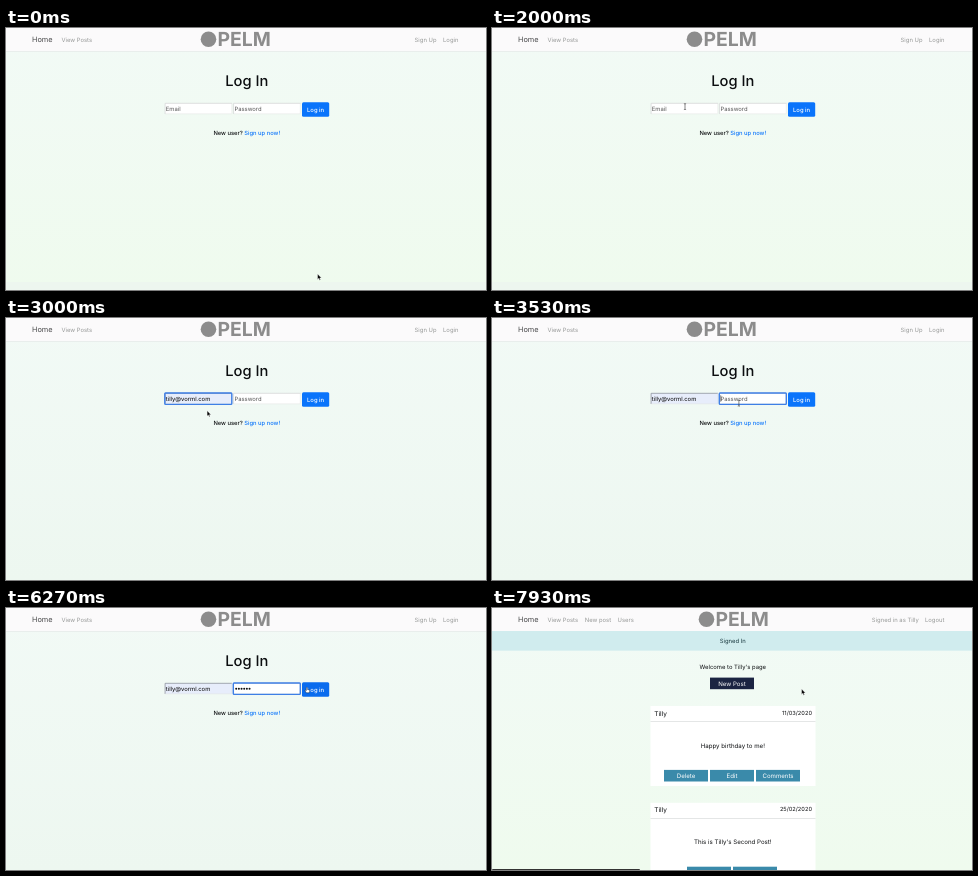
An HTML page that plays this animation: 480x262 px, repeating every 8000 ms.

```html
<!DOCTYPE html>
<html lang="en">
<head>
<meta charset="utf-8">
<title>Log In</title>
<style>
  html, body { margin: 0; width: 100%; height: 100%; overflow: hidden; background: #f0faf3; }
  svg { display: block; width: 100%; height: 100%; }
  text {
    font-family: Inter, Roboto, "Liberation Sans", sans-serif;
    text-rendering: geometricPrecision;
    white-space: pre;
  }
</style>
</head>
<body>
<svg id="stage" viewBox="0 0 480 262"></svg>
<script>
const LOOP = 8000;
const BASE = 5.88;
const INK = "#0c0e10", MUTED = "#969897", BLUE = "#0a74fb", TEAL = "#3a8aaa", LOGO = "#8c8c8c";
const BOLDER = 'font-weight="500"';
const NAME = "Tilly", MAIL = "tilly@vorml.com";
const MAILS = [MAIL, "t60352@vorml.com", "sam@vorml.com", "nora@vorml.com", "tim@vorml.com", "sam@vorml"];

const rect = (x, y, w, h, fill, more = "") =>
  `<rect x="${x}" y="${y}" width="${w}" height="${h}" fill="${fill}" ${more}/>`;
const text = (x, y, str, fill = INK, size = BASE, more = "") =>
  `<text x="${x}" y="${y}" fill="${fill}" font-size="${size}" ${more}>${str}</text>`;
const mid = (x, y, str, fill, size, more = "") =>
  text(x, y, str, fill, size, `text-anchor="middle" ${more}`);
const end = (x, y, str, fill, size) => text(x, y, str, fill, size, 'text-anchor="end"');
const group = (id, body) => `<g id="${id}">${body}</g>`;

function logo(x) {
  return `<circle cx="${x + 7.5}" cy="11.2" r="7.8" fill="${LOGO}"/>` +
    text(x + 16.5, 18.2, "PELM", LOGO, 19.4, 'font-weight="700"');
}

function button(x, y, label, fill = TEAL) {
  return rect(x, y, 44, 11.6, fill) + mid(x + 22, y + 8.1, label, "#fff", 6.1);
}

function field(id, x) {
  return rect(x, 75, 67.2, 11, "#fff", `id="${id}Box"`) +
    `<path id="${id}Edge" d="M${x + .3} 86V75.3H${x + 67.2}" fill="none" stroke="#cfd2d1" stroke-width=".7"/>` +
    `<path d="M${x} 85.8H${x + 67}V75" fill="none" stroke="#dfe3e1" stroke-width=".5"/>` +
    rect(x, 75, 67, 11.4, "none", `id="${id}Ring" rx=".8" stroke="#3f7fe6" stroke-width="1.4"`);
}

function card(y, date, message, labels) {
  const left = 240 - labels.length * 23 + 1;
  return rect(158.5, y, 165, 80, "#fff") +
    text(162.3, y + 9.6, NAME, INK, 6.5) +
    end(320, y + 8.6, date, INK, 5.7) +
    rect(158.5, y + 15.2, 165, .6, "#d3d6d5") +
    mid(240.8, y + 41.6, message, INK, 6.15) +
    labels.map((label, i) => button(left + i * 46, y + 63.9, label)).join("");
}

const loginPage =
  logo(195) +
  text(408.6, 14, "Sign Up", MUTED) + end(452.4, 14, "Login", MUTED) +
  mid(240.8, 57.7, "Log In", INK, 14.7, 'font-weight="550"') +
  mid(240.8, 106.8, `New user? <tspan fill="${BLUE}">Sign up now!</tspan>`, INK, 5.8, BOLDER) +
  field("mail", 158.8) + field("pass", 227.3) +
  text(159.8, 82.7, "Email", "#555", BASE, 'id="mailText"') +
  text(228.4, 82.7, "Password", "#555", BASE, 'id="passText"') +
  group("dots", Array.from({ length: 6 }, (_, i) =>
    `<circle cx="${230.2 + i * 2.67}" cy="80.8" r="1" fill="#111"/>`).join("")) +
  rect(0, 77.3, .5, 6.4, "#111", 'id="caret"') +
  rect(296, 74.2, 27.2, 14.6, BLUE, 'id="submit" rx="1.5"') +
  mid(309.6, 83.7, "Log in", "#fff", BASE, BOLDER) +
  group("menu",
    rect(158, 87.2, 75.4, 90.6, "#000", 'rx="1.2" opacity=".12"') +
    rect(158.6, 86.8, 74, 90, "#fff", 'rx="1" stroke="#c3c8c6" stroke-width=".6"') +
    rect(159, 90.2, 73.2, 13.6, "#e4e6e8", 'id="hover"') +
    MAILS.map((m, i) => text(163, 98.9 + i * 13.93, m, "#111", 5.05, BOLDER)).join(""));

const homePage =
  logo(207) +
  text(92.8, 14, "New post", MUTED) + text(125.6, 14, "Users", MUTED) +
  end(426.8, 14, `Signed in as ${NAME}`, MUTED) + end(452.4, 14, "Logout", MUTED) +
  rect(0, 23, 480, 19.6, "#d0ecee") +
  mid(240.8, 35.3, "Signed In", "#17373d") +
  mid(240.8, 61.2, `Welcome to ${NAME}'s page`) +
  button(218, 69.6, "New Post", "#1b2442") +
  card(98, "11/03/2020", "Happy birthday to me!", ["Delete", "Edit", "Comments"]) +
  card(194.8, "25/02/2020", `This is ${NAME}'s Second Post!`, ["Delete", "Edit"]);

const cursors =
  group("arrow", '<path d="M0 0V5.4L1.2 4.3 2 6.2 2.9 5.8 2.1 4H3.8Z" fill="#000" stroke="#fff" stroke-width=".35"/>') +
  group("beam", '<path d="M-1.1 -3Q0 -3 0 -2.4Q0 -3 1.1 -3M0 -2.4V2.4M-1.1 3Q0 3 0 2.4Q0 3 1.1 3" fill="none" stroke="#333" stroke-width=".6"/>') +
  group("hand", '<path d="M-.5 0Q0 -.5 .5 0V1.8L2.5 2.3Q3 2.5 2.9 3.2L2.4 5.2H-.4L-2 3Q-1.6 2.3 -.5 3.1Z" fill="#fff" stroke="#111" stroke-width=".4"/>');

const stage = document.getElementById("stage");
stage.innerHTML =
  '<defs><linearGradient id="bg" x2="0" y2="1"><stop stop-color="#f2faf6"/><stop id="bgEnd" offset="1"/></linearGradient></defs>' +
  rect(0, 0, 480, 262, "url(#bg)") +
  rect(0, 254, 480, 8, "#edf6ef", 'id="strip"') +
  rect(0, 0, 480, 23.2, "#fbfafb") + rect(0, 23, 480, .8, "#e6ecea") +
  text(26, 14.3, "Home", "#4c4d4e", 7.35) + text(55.5, 14, "View Posts", MUTED) +
  group("login", loginPage) + group("home", homePage) +
  rect(0, 261, 148, 2, "#333", 'id="status" rx="1"') +
  group("pointer", cursors);

const el = {};
stage.querySelectorAll("[id]").forEach(node => el[node.id] = node);
const show = (node, on) => node.setAttribute("display", on ? "inline" : "none");
const set = (node, key, value) => node.setAttribute(key, value);

// time, x, y of the pointer
const PATH = [
  [0, 311.6, 246], [400, 311.6, 246], [1000, 196.8, 95], [1530, 196.8, 95],
  [1670, 197, 101.5], [2000, 193, 78.6], [2200, 193, 78.6], [2530, 193, 89.2],
  [2670, 193, 94], [2870, 193, 94], [3400, 246.9, 85.2], [5870, 246.9, 85.2],
  [6270, 300.8, 79.6], [6400, 309.6, 81], [LOOP, 309.6, 81]
];
const KEYS = [4200, 4470, 4730, 5070, 5400, 5730];

function pointerAt(t) {
  const i = Math.max(1, PATH.findIndex(p => p[0] >= t));
  const [t0, x0, y0] = PATH[i - 1], [t1, x1, y1] = PATH[i];
  const u = (t - t0) / (t1 - t0), k = u * u * (3 - 2 * u);
  return [x0 + (x1 - x0) * k, y0 + (y1 - y0) * k];
}

function draw(time) {
  const step = Math.floor((time + 5) * .015);
  const t = Math.min(LOOP, Math.round(step / .15) * 10);
  const between = (a, b) => t >= a && t < b;
  const home = t >= 7600;
  const filled = t >= 2930;
  show(el.login, !home);
  show(el.home, home);
  show(el.strip, !filled);
  set(el.bgEnd, "stop-color", filled && !home ? "#edf7f0" : "#effbee");
  show(el.status, between(7130, 7600) || t >= 7930);

  const mailFocus = between(2200, 3470), passFocus = between(3470, 6670);
  const typed = KEYS.filter(k => t >= k).length;
  show(el.mailRing, mailFocus);
  show(el.passRing, passFocus);
  show(el.menu, between(2200, 2930));
  show(el.hover, t >= 2670);
  set(el.mailBox, "fill", filled ? "#e7edfb" : "#fff");
  set(el.mailEdge, "stroke", filled ? "#858890" : "#cfd2d1");
  set(el.mailText, "fill", filled ? "#000" : "#555");
  el.mailText.textContent = filled ? MAIL : "Email";
  show(el.passText, !typed);
  [...el.dots.children].forEach((dot, i) => show(dot, i < typed));
  show(el.caret, between(2200, 2930) || between(3470, 5930));
  set(el.caret, "x", passFocus ? 228.6 + typed * 2.75 : 159.9);

  const [x, y] = pointerAt(t);
  const onButton = x > 296 && x < 323 && y > 74 && y < 88.6;
  const onField = x > 159 && x < 294 && y > 75 && y < 86;
  const hand = onButton && t < 6730, beam = onField && !onButton;
  set(el.submit, "fill", t >= 6730 ? "#62a4f3" : hand ? "#0a6cee" : BLUE);
  set(el.pointer, "transform", `translate(${x} ${y})`);
  show(el.pointer, !between(4200, 5930));
  show(el.hand, hand);
  show(el.beam, beam);
  show(el.arrow, !hand && !beam);
}

const start = performance.now();
function tick() {
  draw((performance.now() - start) % LOOP);
  requestAnimationFrame(tick);
}
tick();
</script>
</body>
</html>
```
